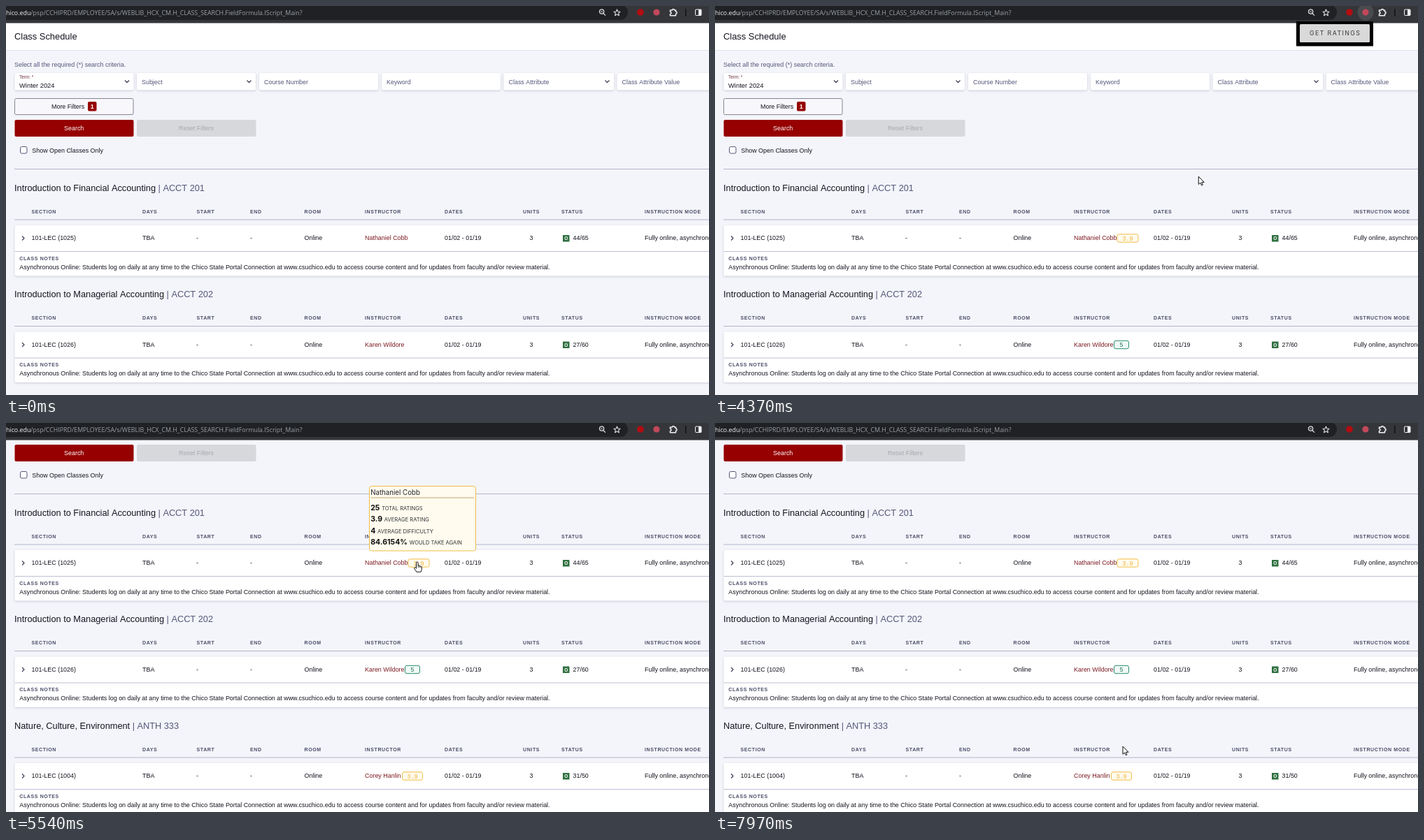
Write an HTML page with a canvas that moves like this. It is 1005 px wide and 557 px high and loops after 8000 ms.

```html
<!DOCTYPE html>
<html lang="en">
<head>
<meta charset="utf-8">
<title>Class Schedule</title>
<style>
html, body { margin: 0; width: 100%; height: 100%; overflow: hidden; background: #f4f5fa; }
canvas { display: block; }
</style>
</head>
<body>
<canvas id="stage" width="1005" height="557"></canvas>
<script>
const ctx = document.getElementById('stage').getContext('2d');
const LOOP = 8000;
const SANS = '"Liberation Sans", Arial, sans-serif';
const ROUND = 'Inter, sans-serif';
const INK = '#14151f', SLATE = '#55577a', RED = '#960000', RULE = '#b3b5ce';
const GOLD = { line: '#f2bd45', fill: '#fffbee', text: '#efae2c' };
const GREEN = { line: '#2a8c70', fill: '#effaf6', text: '#1b6b56' };
const PITCH = 152.5;

const courses = [
  { title: 'Introduction to Financial Accounting', code: 'ACCT 201', section: '1025', teacher: 'Nathaniel Cobb',
    seats: '44/65', score: '3.9', badge: [575, 30], skin: GOLD, from: 3220 },
  { title: 'Introduction to Managerial Accounting', code: 'ACCT 202', section: '1026', teacher: 'Karen Wildore',
    seats: '27/60', score: '5', badge: [570.5, 21], skin: GREEN, from: 3500 },
  { title: 'Nature, Culture, Environment', code: 'ANTH 333', section: '1004', teacher: 'Corey Hanlin',
    seats: '31/50', score: '3.9', badge: [566.5, 29], skin: GOLD, from: 3800 }
];
const heads = [['SECTION', 36.5], ['DAYS', 195], ['START', 272.5], ['END', 349], ['ROOM', 426.5],
  ['INSTRUCTOR', 513], ['DATES', 627], ['UNITS', 739], ['STATUS', 794], ['INSTRUCTION MODE', 913]];
const notes = 'Asynchronous Online: Students log on daily at any time to the Chico State Portal Connection ' +
  'at www.csuchico.edu to access course content and for updates from faculty and/or review material.';

const tips = [
  { x: 519.5, y: 90.5, name: courses[0].teacher, skin: GOLD, spans: [[5400, 5960], [7270, 7580]],
    rows: [['25', 'TOTAL RATINGS'], ['3.9', 'AVERAGE RATING'], ['4', 'AVERAGE DIFFICULTY'], ['84.6154%', 'WOULD TAKE AGAIN']] },
  { x: 515.5, y: 243.5, name: courses[1].teacher, skin: GREEN, spans: [[6350, 6830]],
    rows: [['3', 'TOTAL RATINGS'], ['5', 'AVERAGE RATING'], ['2', 'AVERAGE DIFFICULTY'], ['100%', 'WOULD TAKE AGAIN']] }
];

// Keyframes: time, then values
const scrollKeys = [[4860, 0], [5050, 86.5], [5220, 132]];
const pointerKeys = [[130, 980, 557], [480, 958, 120], [640, 912, 14], [900, 930, 9], [970, 930, 9],
  [1250, 900, 38], [1590, 926, 33], [1730, 922, 34], [2100, 860, 86], [2430, 803, 138], [3220, 803, 138],
  [3600, 809, 132], [4020, 797, 145], [4370, 692, 244], [4630, 497, 272], [4840, 562, 240], [5050, 630, 202],
  [5400, 587, 198], [5740, 589, 201], [5940, 589, 201], [6420, 580, 357], [6800, 580, 357],
  [7220, 585, 212], [7290, 587, 202], [7560, 587, 202], [7970, 583, 463]];
const handSpans = [[1080, 1860], [5370, 5960], [6340, 6860], [7130, 7590]];

const arrow = new Path2D('M0 0V11.3L2.6 8.9L4.3 12.7L6 12L4.4 8.3H8Z');
const hand = new Path2D('M-1.3 8.5V1Q-1.3 -.3 0 -.3T1.3 1V5Q2.8 4.5 3.3 5.5Q4.7 5 5 6.1Q6.4 5.8 6.5 7.2V10' +
  'Q6.3 12 5.3 14H-1Q-2 12 -4 9.6Q-4.8 8 -3.6 7.6Q-2.4 7.6 -1.3 9Z');
const knuckles = new Path2D('M1.3 5V8M3.3 5.5V8M5 6.1V8');
const star = new Path2D('M0 -4.6L1.3 -1.5L4.6 -1.3L2.1 .9L2.9 4.2L0 2.4L-2.9 4.2L-2.1 .9L-4.6 -1.3L-1.3 -1.5Z');
const puzzle = new Path2D('M-4.5 -3H-1.6A1.6 1.6 0 1 1 1.6 -3H3.5V-.9A1.6 1.6 0 1 1 3.5 2.3V4.7H-4.5V2.4A1.5 1.5 0 0 0 -4.5 -.7Z');

const within = (t, spans) => spans.some(([a, b]) => t >= a && t < b);
const clamp = v => Math.min(1, Math.max(0, v));

function at(keys, t) {
  let i = 0;
  while (i < keys.length - 2 && t > keys[i + 1][0]) i++;
  const [a, b] = [keys[i], keys[i + 1]];
  const k = clamp((t - a[0]) / (b[0] - a[0]));
  return a.slice(1).map((v, n) => v + (b[n + 1] - v) * k);
}

function text(s, x, y, size = 8.93, color = INK, { font = SANS, weight = 400, gap = 0, align = 'left' } = {}) {
  ctx.font = `${weight} ${size}px ${font}`;
  ctx.letterSpacing = gap + 'px';
  ctx.textAlign = align;
  ctx.fillStyle = color;
  ctx.fillText(s, x, y);
  return ctx.measureText(s).width;
}
const label = (s, x, y) => text(s, x, y, 7.01, '#4b4d68', { weight: 700, gap: 0.62 });

function rect(x, y, w, h, fill) {
  ctx.fillStyle = fill;
  ctx.fillRect(x, y, w, h);
}

function box(x, y, w, h, r, fill, line) {
  ctx.beginPath();
  ctx.roundRect(x, y, w, h, r);
  if (fill) { ctx.fillStyle = fill; ctx.fill(); }
  if (line) { ctx.strokeStyle = line; ctx.lineWidth = 1; ctx.stroke(); }
}

function dot(x, y, r, fill) {
  ctx.beginPath();
  ctx.arc(x, y, r, 0, 7);
  ctx.fillStyle = fill;
  ctx.fill();
}

function card(x, y, w, h) {
  ctx.save();
  ctx.shadowColor = 'rgba(50,52,90,.22)';
  ctx.shadowBlur = 3;
  ctx.shadowOffsetY = 1;
  box(x, y, w, h, 2, '#fff');
  ctx.restore();
}

function stroke(path, x, y, color, width = 1.2, fill) {
  ctx.save();
  ctx.translate(x, y);
  if (fill) { ctx.fillStyle = fill; ctx.fill(path); }
  ctx.strokeStyle = color;
  ctx.lineWidth = width;
  ctx.lineJoin = 'round';
  ctx.stroke(path);
  ctx.restore();
}
const caret = new Path2D('M-3 -1.5L0 1.5L3 -1.5');
const chevron = new Path2D('M-1.5 -3L1.5 0L-1.5 3');

function form() {
  rect(0, 24, 1005, 39, '#fff');
  rect(0, 63, 1005, 1, '#e1e2eb');
  text('Class Schedule', 12, 48, 12.9);
  text('Select all the required (*) search criteria.', 12, 87, 8.93, SLATE);

  const fields = [['', 12.5, 170, 1], ['Subject', 187, 170, 1], ['Course Number', 362, 170],
    ['Keyword', 537, 170], ['Class Attribute', 711.5, 157.5, 1], ['Class Attribute Value', 873.5, 140]];
  for (const [name, x, w, open] of fields) {
    card(x, 96, w, 24.5);
    text(name, x + 7, 111.5, 8.93, SLATE);
    if (open) stroke(caret, x + w - 9.5, 108, '#3d3f55', 1.2);
  }
  text('Term: *', 19, 104, 6.4, '#6b3040');
  text('Winter 2024', 19, 117, 9.4);

  box(12.5, 132.5, 169.5, 23, 2, '#f8f8fc', '#83848f');
  text('More Filters', 65, 147);
  box(117, 137, 12.5, 13.5, 2, RED);
  text('1', 123.3, 147, 8.93, '#fff', { weight: 700, align: 'center' });
  box(12.5, 163, 170, 24, 2, RED);
  text('Search', 97.2, 178, 8.93, '#fff', { align: 'center' });
  box(187, 163, 170.5, 24, 2, '#d7d8db');
  text('Reset Filters', 272, 178, 8.93, '#a8a9b1', { align: 'center' });
  box(20.5, 201.5, 9.5, 9.5, 2, '#fff', SLATE);
  text('Show Open Classes Only', 37.3, 209.5);
  rect(12, 233, 993, 1, RULE);
}

function course(c, t) {
  const w = text(c.title, 12, 264.5, 12.75);
  text(' | ' + c.code, 12 + w, 264.5, 12.75, SLATE);
  for (const [s, x] of heads) label(s, x, 296.5);
  rect(12, 305.5, 993, 1, RULE);

  card(12.5, 314, 1000, 72.5);
  rect(12.5, 351, 993, 1, '#bdbfd4');
  stroke(chevron, 24.5, 332.5, '#3d3f55', 1.2);
  const cells = [[`101-LEC (${c.section})`, 36.5], ['TBA', 195], ['-', 272], ['-', 349], ['Online', 426.5],
    ['01/02 - 01/19', 627], ['3', 748.5], [c.seats, 810.5], ['Fully online, asynchronous', 913]];
  for (const [s, x] of cells) text(s, x, 335);
  text(c.teacher, 513, 335.3, 8.93, '#7c1a20');
  rect(796, 328, 9.5, 9.5, '#2f7040');
  text('O', 800.8, 335.3, 6.5, '#fff', { weight: 700, align: 'center' });
  if (t >= c.from) {
    const [x, bw] = c.badge;
    box(x, 326.8, bw, 11.4, 2.5, c.skin.fill, c.skin.line);
    text(c.score, x + bw / 2, 335.6, 8.3, c.skin.text, { font: '"Liberation Mono", monospace', align: 'center' });
  }
  label('CLASS NOTES', 19.3, 363.7);
  text(notes, 19.3, 376.5);
}

function tooltip({ x, y, name, skin, rows }) {
  box(x, y, 152, 92.5, 3, skin.fill, skin.line);
  const font = { font: ROUND };
  text(name, x + 1.7, y + 12, 9.7, '#24252c', font);
  rect(x + 2, y + 16, 148, 1, skin === GOLD ? '#c9a873' : '#7fb3a4');
  rows.forEach(([n, s], i) => {
    const base = y + 34.2 + i * 16.5;
    const w = text(n, x + 1.7, base, 10.6, '#111', { font: ROUND, weight: 700 });
    text(s, x + w + 4.4, base, 7.55, '#33343a', font);
  });
}

function toolbar(t) {
  rect(0, 0, 1005, 24.5, '#35363a');
  box(-20, -2, 909, 22, [0, 11, 11, 0], '#202124');
  const opt = { font: '"Open Sans", sans-serif' };
  const w = text('hico.edu', 0, 12.5, 8.83, '#f1f3f4', opt);
  text('/psp/CCHIPRD/EMPLOYEE/SA/s/WEBLIB_HCX_CM.H_CLASS_SEARCH.FieldFormula.IScript_Main?',
    w, 12.5, 8.83, '#9aa0a6', opt);

  const light = '#dfe1e5';
  stroke(new Path2D('M2.8 -1A3.2 3.2 0 1 1 -3.6 -1A3.2 3.2 0 1 1 2.8 -1M1.9 1.5L5 4.6M-2 -1H1.2'), 852, 9, light, 1.2);
  stroke(star, 873.5, 9.5, light, 1.1);
  if (within(t, [[610, 740]])) dot(907, 9, 11.5, '#4a4b4f');
  if (within(t, [[740, 5200]])) dot(930, 9, 11.5, '#4a4b4f');
  dot(907, 9, 4.8, '#b20d10');
  dot(930, 9, 4.6, '#c2485a');
  stroke(puzzle, 954, 9, '#f1f3f4', 1.5);
  rect(971, 4, 1.5, 11, '#111214');
  box(985.5, 5, 8.5, 8.5, 1, null, '#f1f3f4');
  rect(990, 5, 4, 8.5, '#f1f3f4');
}

function popup(t) {
  if (t < 970 || t >= 4800) return;
  ctx.globalAlpha = clamp((t - 940) / 110);
  rect(831, 22, 110, 35.5, '#000');
  const hover = within(t, [[1080, 1860]]);
  box(836, 26, 100, 26, 1.5, hover ? '#e5e5e5' : '#d9d9d9');
  text('GET RATINGS', 850, 42.2, 8.8, '#3a3a3d', { font: ROUND, gap: 1.4 });
  ctx.globalAlpha = 1;
}

function pointer(t) {
  if (t < 130) return;
  const [x, y] = at(pointerKeys, t);
  const isHand = within(t, handSpans);
  stroke(isHand ? hand : arrow, x, y, '#111', 1, '#fff');
  if (isHand) stroke(knuckles, x, y, '#111', 0.7);
}

function draw(t) {
  rect(0, 0, 1005, 557, '#f4f5fa');
  const [scroll] = at(scrollKeys, t);
  ctx.save();
  ctx.translate(0, -scroll);
  form();
  for (const c of courses) {
    course(c, t);
    ctx.translate(0, PITCH);
  }
  ctx.restore();
  for (const tip of tips) if (within(t, tip.spans)) tooltip(tip);
  toolbar(t);
  popup(t);
  pointer(t);
}

const start = performance.now();
function tick(now) {
  draw(Math.max(0, now - start) % LOOP);
  requestAnimationFrame(tick);
}
tick(start);
</script>
</body>
</html>
```
